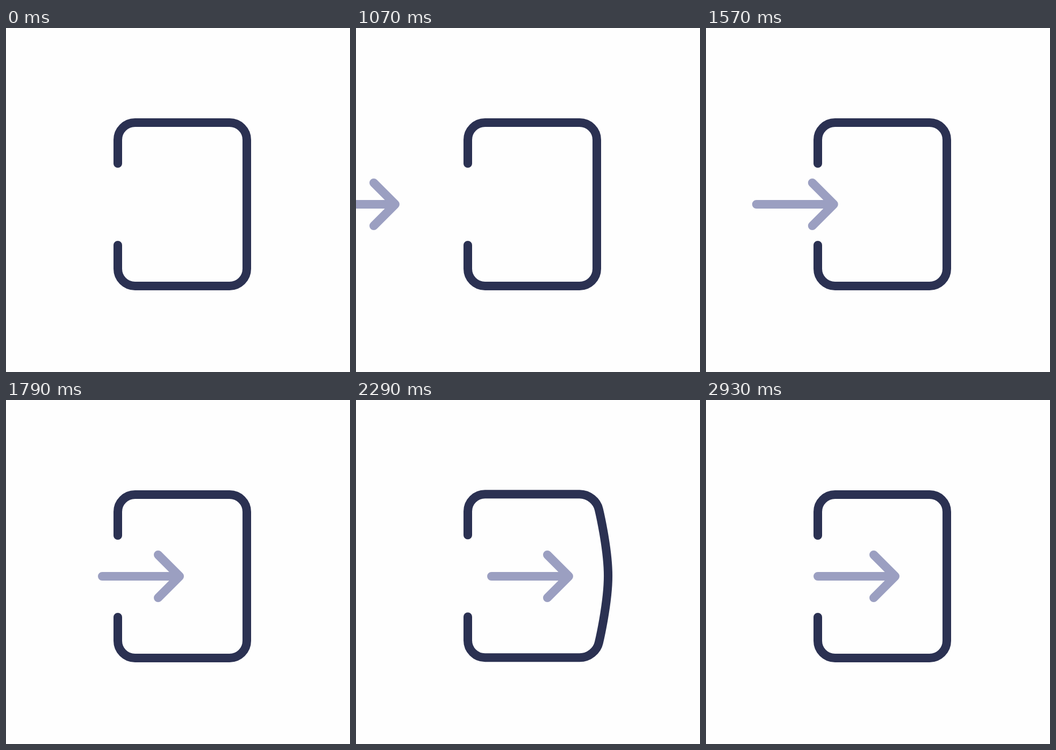
Recreate the animation shown at these times as an HTML page. Size 640 by 640 pixels, loop 4.87 s.

```html
<!DOCTYPE html>
<html lang="en">
<head>
<meta charset="utf-8">
<title>Arrow entering a box</title>
<style>
  html, body { margin: 0; height: 100%; overflow: hidden; background: #fefefe; }
  svg { display: block; width: 100%; height: 100%; }
  path { fill: none; stroke-width: 16; stroke-linecap: round; stroke-linejoin: round; }
</style>
</head>
<body>
<svg viewBox="0 0 640 640">
  <path id="box" stroke="#2b3152"/>
  <path id="arrow" stroke="#9b9fc1" d="M208 328H352M312 288L352 328L312 368"/>
</svg>
<script>
const LOOP = 4870, FPS = 14;
const box = document.getElementById('box');
const arrow = document.getElementById('arrow');

// Arrow offset keys: [step, offset, velocity per step]
const keys = [
  [5, -360, 0], [10, -344.3, 8], [13, -311, 13.5], [18, -217, 22.5], [21, -142, 27],
  [25, -29, 27], [30, 47, 0], [32, 44, -3], [37, 17.5, -5.8], [41, 0, 0]
];

function smooth(a, b, x) {
  const p = Math.min(1, Math.max(0, (x - a) / (b - a)));
  return p * p * (3 - 2 * p);
}

// Cubic Hermite interpolation between the keys
function arrowOffset(n) {
  if (n <= keys[0][0]) return -380;
  const i = keys.findIndex(k => k[0] >= n);
  if (i < 0) return 0;
  const [n0, x0, v0] = keys[i - 1], [n1, x1, v1] = keys[i];
  const h = n1 - n0, p = (n - n0) / h, q = 1 - p;
  return x0 + (x1 - x0) * p * p * (3 - 2 * p) + h * p * q * (v0 * q - v1 * p);
}

// The right wall bows outwards by b (0 to 1)
function boxPath(b) {
  const mid = 448 + 22 * b, side = 448 + 4 * b, reach = 54 * b;
  const top = 208 - 4 * b, low = 448 + 4.5 * b, lean = 448 + 0.5 * b;
  return `M208 252V208A32 32 0 0 1 240 176H416
    C433.7 176 ${lean} ${top - 17.7 + 3 * b} ${side} ${top}
    C${side} ${top} ${mid} ${328 - reach} ${mid} 328
    C${mid} ${328 + reach} ${side} ${low} ${side} ${low}
    C${lean} ${low + 17.7 - 3 * b} 433.7 480 416 480
    H240A32 32 0 0 1 208 448V404`;
}

function draw(now) {
  const n = Math.floor((now % LOOP + 4.5) * FPS / 1000);
  const bulge = smooth(28, 31, n) - smooth(31, 39, n);
  box.setAttribute('d', boxPath(bulge));
  box.setAttribute('transform', `translate(0 ${-0.8 * bulge})`);
  arrow.setAttribute('transform', `translate(${arrowOffset(n)} 0)`);
}

const start = performance.now();
function tick() {
  draw(performance.now() - start);
  requestAnimationFrame(tick);
}
tick();
</script>
</body>
</html>
```
